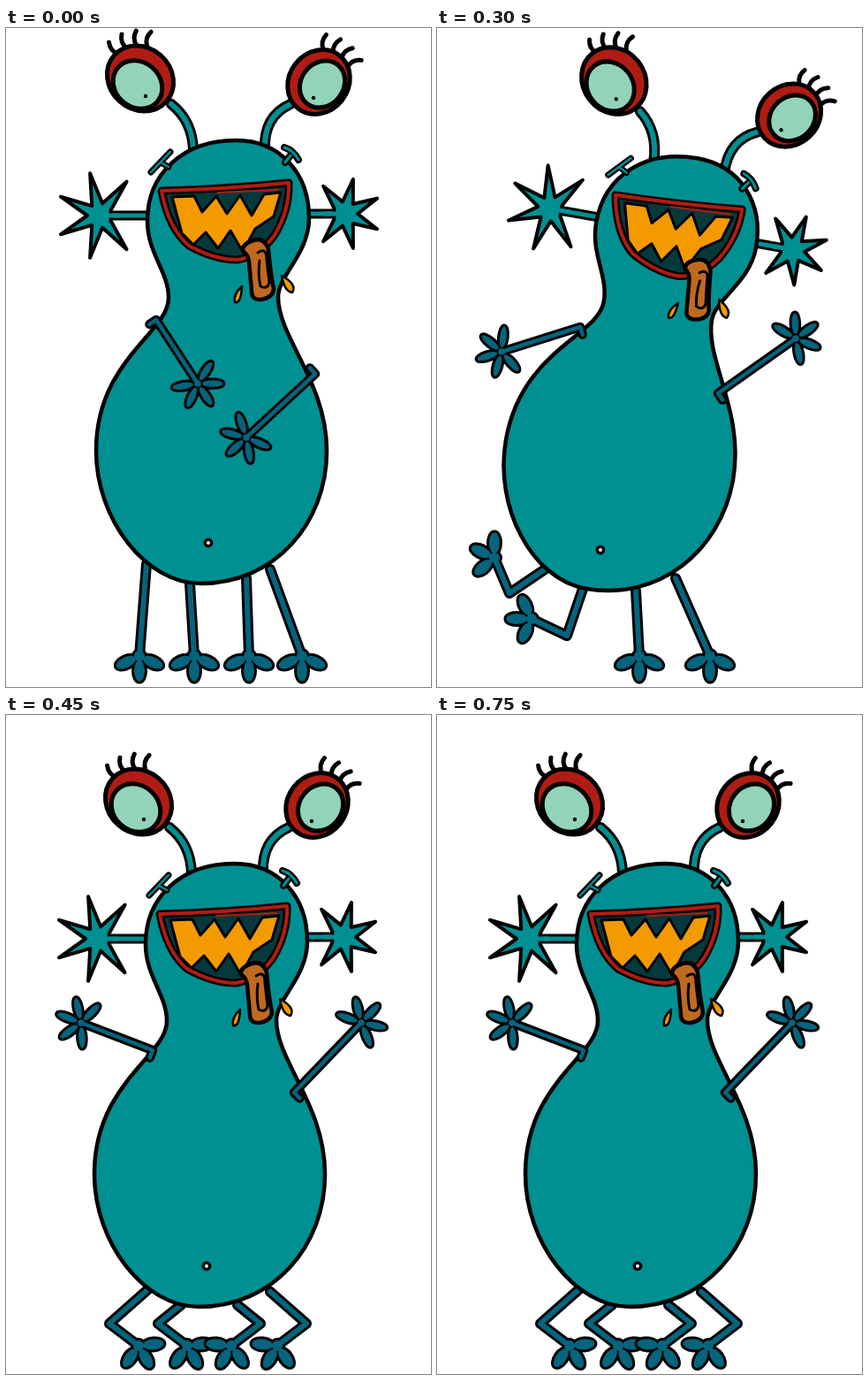
An HTML page with a canvas for the animation above (900 ms loop, 481 by 745 pixels).

```html
<!DOCTYPE html>
<html lang="en">
<head>
<meta charset="utf-8">
<title>Dancing monster</title>
<style>
  html, body { margin: 0; width: 100%; height: 100%; overflow: hidden; background: #fff; }
  canvas { display: block; }
</style>
</head>
<body>
<canvas id="stage" width="481" height="745"></canvas>
<script>
const ctx = document.getElementById('stage').getContext('2d');
const TEAL = '#009092', BLUE = '#06647c', RED = '#b01c13', MINT = '#92d3b9',
      ORANGE = '#f39a00', BROWN = '#c06a20', INK = '#000';
const STEP = 150, NAVEL = [229, 582];

const radians = degrees => degrees * Math.PI / 180;
const polar = (x, y, radius, degrees) =>
  [x + radius * Math.cos(radians(degrees)), y + radius * Math.sin(radians(degrees))];
const toPath = p => p instanceof Path2D ? p : new Path2D(p);
const polygon = points => new Path2D(`M${points.join('L')}Z`);

function ellipse(x, y, rx, ry, tilt = 0) {
  const path = new Path2D();
  path.ellipse(x, y, rx, ry, radians(tilt), 0, 2 * Math.PI);
  return path;
}

function line(path, color, width) {
  ctx.strokeStyle = color;
  ctx.lineWidth = width;
  ctx.stroke(toPath(path));
}

function shape(path, fill, width) {
  ctx.fillStyle = fill;
  ctx.fill(toPath(path));
  if (width) line(path, INK, width);
}

function tube(path, color, inner, outer) {
  line(path, INK, outer);
  line(path, color, inner);
}

// A jointed bone ending in a fan of rounded digits.
function limb(joints, heading, { count, spread, length, fat, thick }) {
  const bone = `M${joints.join('L')}`;
  const [x, y] = joints.at(-1);
  const digits = ellipse(x, y, fat, fat);
  for (let i = 0; i < count; i++) {
    const angle = heading + spread * (i - (count - 1) / 2);
    digits.addPath(ellipse(...polar(x, y, length * .6, angle), length * .42, fat, angle));
  }
  line(bone, INK, thick);
  line(digits, INK, 6);
  line(bone, BLUE, thick - 6);
  shape(digits, BLUE);
}

const FOOT = { count: 3, spread: 65, length: 28, fat: 6, thick: 12 };
const HAND = { count: 5, spread: 57, length: 28, fat: 3.8, thick: 10.5 };

// Leg moves; side is -1 for left and 1 for right.
const straight = (x, y, lean) => limb([[x, y], [x + lean, 710]], 90, FOOT);

function squat(x, y, side) {
  const knee = x + side * (693 - y);
  limb([[x, y], [knee, 688], [knee - side * 33, 713]], 90 + side * 30, FOOT);
}

function kick(x, y, side) {
  limb([[x, y], [x + side * 18, y + 53], [x + side * 58, y + 34]], side < 0 ? 180 : 0, FOOT);
}

function highKick(x, y, side) {
  limb([[x, y], [x + side * 43, y + 29], [x + side * 60, y - 11]], side < 0 ? 205 : -25, FOOT);
}

// The shoulder ends in a short hook square to the arm.
function arm(x, y, handX, handY, turn = 1) {
  const heading = Math.atan2(handY - y, handX - x) * 180 / Math.PI;
  limb([polar(x, y, 9, heading + 90 * turn), [x, y], [handX, handY]], heading, HAND);
}

// One of the star's seven rays is the arm.
function starHand(x, y, radius, armAngle) {
  const shoulder = polar(x, y, 54, armAngle), points = [];
  for (let i = 1; i < 14; i++)
    points.push(polar(x, y, i % 2 ? 14 : radius, armAngle + i * 180 / 7));
  tube(`M${shoulder}L${x} ${y}`, TEAL, 5, 11);
  shape(polygon(points), TEAL, 4);
  line(`M${x} ${y}L${polar(x, y, 22, armAngle)}`, TEAL, 5);
}

function eye(x, y, tilt, size, iris, pupil, lashAngle) {
  for (let i = 0; i < 4; i++) {
    const angle = lashAngle + i * 18;
    line(`M${polar(x, y, 37, angle)}Q${polar(x, y, 46, angle - 6)} ${polar(x, y, 54, angle + 1)}`, INK, 5);
  }
  shape(ellipse(x, y, size, size - 4.5, tilt), RED, 5);
  shape(ellipse(...iris, size - 10, size - 14, tilt), MINT, 5);
  shape(ellipse(...pupil, 2.2, 2.2), INK);
}

function drawTeeth() {
  const points = [[188, 191], [213, 190]];
  for (let i = 0; i < 3; i++)
    points.push([222 + 28 * i, 208 + 2 * i], [238 + 27 * i, 190 - i]);
  points.push([311, 186], [303, 213]);
  for (let i = 2; i >= 0; i--)
    points.push([226 + 28 * i, 231 - 2 * i], [212 + 28 * i, 245 + 4 * i]);
  points.push([199, 232]);
  shape(polygon(points), ORANGE, 3);
}

function drawMouth() {
  const lips = 'M176 184Q250 182 320 175Q321 206 304 234Q287 258 262 262Q236 262 207 246Q184 227 176 184Z';
  shape(lips, '#06393b', 9);
  line(lips, RED, 4);
  line('M240 186L308 183', RED, 2);
  drawTeeth();
  shape('M268 252Q267 244 280 240Q292 236 297 250Q299 275 303 295Q302 305 289 307' +
        'Q278 308 278 298L275 264Q274 256 268 252Z', BROWN, 4.5);
  line('M285 254Q295 247 295 262L298 288Q296 296 288 292Q285 279 287 263', INK, 3);
  shape('M267 292Q257 301 259 310Q266 312 267 292Z', ORANGE, 2.5);
  shape('M312 280Q315 298 324 299Q330 290 312 280Z', ORANGE, 2.5);
}

function drawTorso() {
  starHand(106, 212, 49, 0);
  starHand(384, 210, 40, 180);
  tube('M187 86Q211 105 212 138', TEAL, 6, 12);
  tube('M322 86Q291 100 293 138', TEAL, 6, 12);
  eye(152, 57, 42, 39.5, [149, 64], [158, 77], 228);
  eye(354, 61, -52, 38, [358, 63.5], [348, 79], 278);
  shape('M260 127C200 127 160 165 160 218C160 255 184 275 184 305C184 345 102 375 102 478' +
        'C102 555 158 628 220 628C304 628 363 560 363 478C363 400 308 350 308 304' +
        'C308 280 343 255 343 215C343 165 311 127 260 127Z', TEAL, 4.5);
  tube('M186 140L164 163M175 152L184 157', TEAL, 2.5, 7);
  tube('M315 135Q325 138 331 149M322 144L316 152', TEAL, 3, 8);
  drawMouth();
  shape(ellipse(...NAVEL, 3.7, 3.7), '#fff', 3.5);
}

const poses = {
  stand: {
    navel: NAVEL, tilt: 0,
    legs() { straight(159, 606, -8); straight(208, 628, 5); straight(272, 622, 3); straight(299, 612, 36); },
    arms() { arm(170, 330, 217, 402); arm(350, 391, 272, 463); }
  },
  squat: {
    navel: [227, 623], tilt: 0,
    legs() { squat(160, 650, -1); squat(198, 667, -1); squat(262, 667, 1); squat(299, 652, 1); },
    arms() { arm(166, 379, 85, 348, -1); arm(326, 427, 402, 348); }
  },
  leanRight: {
    navel: [185, 590], tilt: 10,
    legs() { highKick(125, 610, -1); kick(165, 634, -1); straight(225, 636, 4); straight(270, 622, 39); },
    arms() { arm(162, 338, 73, 366, -1); arm(318, 413, 406, 351); }
  },
  leanLeft: {
    navel: [308, 592], tilt: -18.8,
    legs() { straight(228, 627, -13); straight(282, 644, 3); kick(340, 632, 1); highKick(378, 605, 1); },
    arms() { arm(169, 393, 76, 391, -1); arm(337, 355, 446, 374); }
  }
};
const dance = ['stand', 'squat', 'leanRight', 'squat', 'leanLeft', 'squat'];

function drawPose({ navel, tilt, legs, arms }) {
  ctx.clearRect(0, 0, 481, 745);
  ctx.lineCap = ctx.lineJoin = 'round';
  legs();
  ctx.save();
  ctx.translate(...navel);
  ctx.rotate(radians(tilt));
  ctx.translate(-NAVEL[0], -NAVEL[1]);
  drawTorso();
  ctx.restore();
  arms();
}

function tick() {
  drawPose(poses[dance[Math.floor(performance.now() / STEP) % dance.length]]);
  requestAnimationFrame(tick);
}
tick();
</script>
</body>
</html>
```
